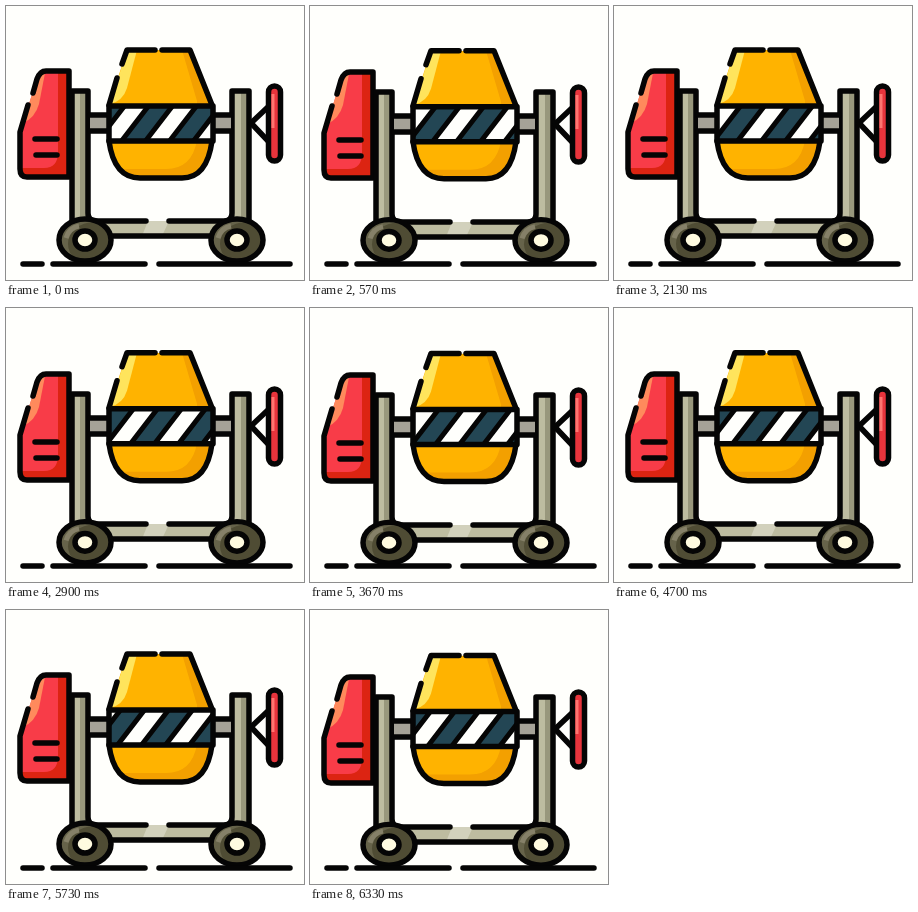
These frames come from a looping animation (298x274 px, 6.36 s). An HTML page:

```html
<!DOCTYPE html>
<html lang="en">
<head>
<meta charset="utf-8">
<title>Concrete mixer</title>
<style>
  html, body { margin: 0; width: 100%; height: 100%; overflow: hidden; background: #fffffc; }
  svg { display: block; width: 298px; height: 274px; }
  .ink { fill: none; stroke: #050505; stroke-width: 5.5; stroke-linecap: round; stroke-linejoin: round; }
</style>
</head>
<body>
<svg viewBox="0 0 298 274">
  <defs>
    <clipPath id="engineClip"><path d="M31 73Q34 65 40 65H63V171H21Q14 171 14 163V126Z"/></clipPath>
    <clipPath id="drumClip"><path d="M121 44H184L206 99V135Q201 172 176 172H134Q108 172 103 135V99Z"/></clipPath>
    <clipPath id="bandClip"><rect x="103" y="100" width="104" height="35"/></clipPath>
    <clipPath id="tyreClip"><ellipse rx="26" ry="21"/></clipPath>
    <g id="wheel">
      <ellipse rx="26" ry="21" fill="#66634a"/>
      <ellipse cx="9" cy="4" rx="26" ry="22" fill="#4f4c34" clip-path="url(#tyreClip)"/>
      <path d="M-19 -2Q-16 -12 -6 -14" fill="none" stroke="#858068" stroke-width="5"/>
      <ellipse class="ink" rx="26" ry="21"/>
      <ellipse class="ink" rx="10" ry="9" style="fill:#fffbe0"/>
    </g>
  </defs>

  <g id="body">
    <g clip-path="url(#engineClip)">
      <rect x="10" y="60" width="56" height="114" fill="#f83c48"/>
      <path d="M52 60H66V174H12V162H38Q52 162 52 146Z" fill="#dc2412"/>
      <path d="M31 62H40L33 98Q29 112 17 117Z" fill="#ff8a5c"/>
    </g>
    <path class="ink" d="M27 87L31 73Q34 65 40 65H63V171H21Q14 171 14 163V126L22 99M29 133H51M30 149H51"/>

    <path d="M66 85H82V207Q82 215 90 215H218Q226 215 226 207V85H243V230H66Z" fill="#bdbca0"/>
    <path d="M74 85H82V215H74ZM235 85H243V215H235Z" fill="#98977c"/>
    <path d="M142 215H163L156 230H136Z" fill="#d2d1bc"/>
    <path class="ink" d="M66 220V85H82V207Q82 215 90 215H140M163 215H218Q226 215 226 207V85H243V220M104 230H206"/>

    <path d="M84 109H103V125H84ZM207 109H225V125H207Z" fill="#a5a297"/>
    <path class="ink" d="M84 109H103M84 125H103M207 109H225M207 125H225"/>

    <path class="ink" d="M263 100L245 117L263 136"/>
    <rect class="ink" x="262.500" y="80" width="12" height="75" rx="6" style="fill:#e8343c"/>
    <path d="M267 88V122" stroke="#ff7570" stroke-width="3"/>
  </g>

  <g id="drum">
    <g clip-path="url(#drumClip)">
      <rect x="100" y="40" width="112" height="135" fill="#ffb300"/>
      <path d="M176 44H190L212 99V176H110V163H160Q186 163 191 134V95Z" fill="#f3a000"/>
      <path d="M121 44H131L121 82Q117 95 104 98Z" fill="#ffe45c"/>
    </g>
    <path class="ink" d="M116 58L121 44H149M156 44H184L206 99M111 72L103 99M103 135Q108 172 134 172H176Q201 172 206 135"/>
    <g clip-path="url(#bandClip)">
      <rect x="103" y="100" width="104" height="35" fill="#234654"/>
      <g id="stripes"></g>
    </g>
    <rect class="ink" x="103" y="100" width="104" height="35"/>
  </g>

  <g id="wheels">
    <use href="#wheel" x="79" y="234"/>
    <use href="#wheel" x="231" y="234"/>
  </g>
  <path class="ink" d="M17 258H36M47 258H139M153 258H284"/>
</svg>
<script>
  const LOOP = 6360, FPS = 30, PITCH = 48;
  const part = id => document.getElementById(id);
  const body = part('body'), drum = part('drum'), wheels = part('wheels'), stripes = part('stripes');

  // Slanted white bars, one pitch apart, with black edges
  let bars = '';
  for (let i = -1; i < 4; i++) {
    const x = 117 + i * PITCH;
    bars += `<path d="M${x + 3} 98H${x + 27}L${x - 3} 137H${x - 27}Z" fill="#fffffc" stroke="#050505" stroke-width="5"/>`;
  }
  stripes.innerHTML = bars;

  function draw(now) {
    const step = Math.floor((now % LOOP + 4) * FPS / 1000);
    const bob = (1 - Math.cos(step * Math.PI / 2)) / 2;
    body.setAttribute('transform', `translate(0 ${bob * 2})`);
    drum.setAttribute('transform', `translate(0 ${bob * 1.5})`);
    wheels.setAttribute('transform', `translate(0 ${bob * 7.7}) scale(1 ${1 - bob * 0.03})`);
    stripes.setAttribute('transform', `translate(${-(step % PITCH)} 0)`);
    requestAnimationFrame(() => draw(performance.now()));
  }
  draw(performance.now());
</script>
</body>
</html>
```
